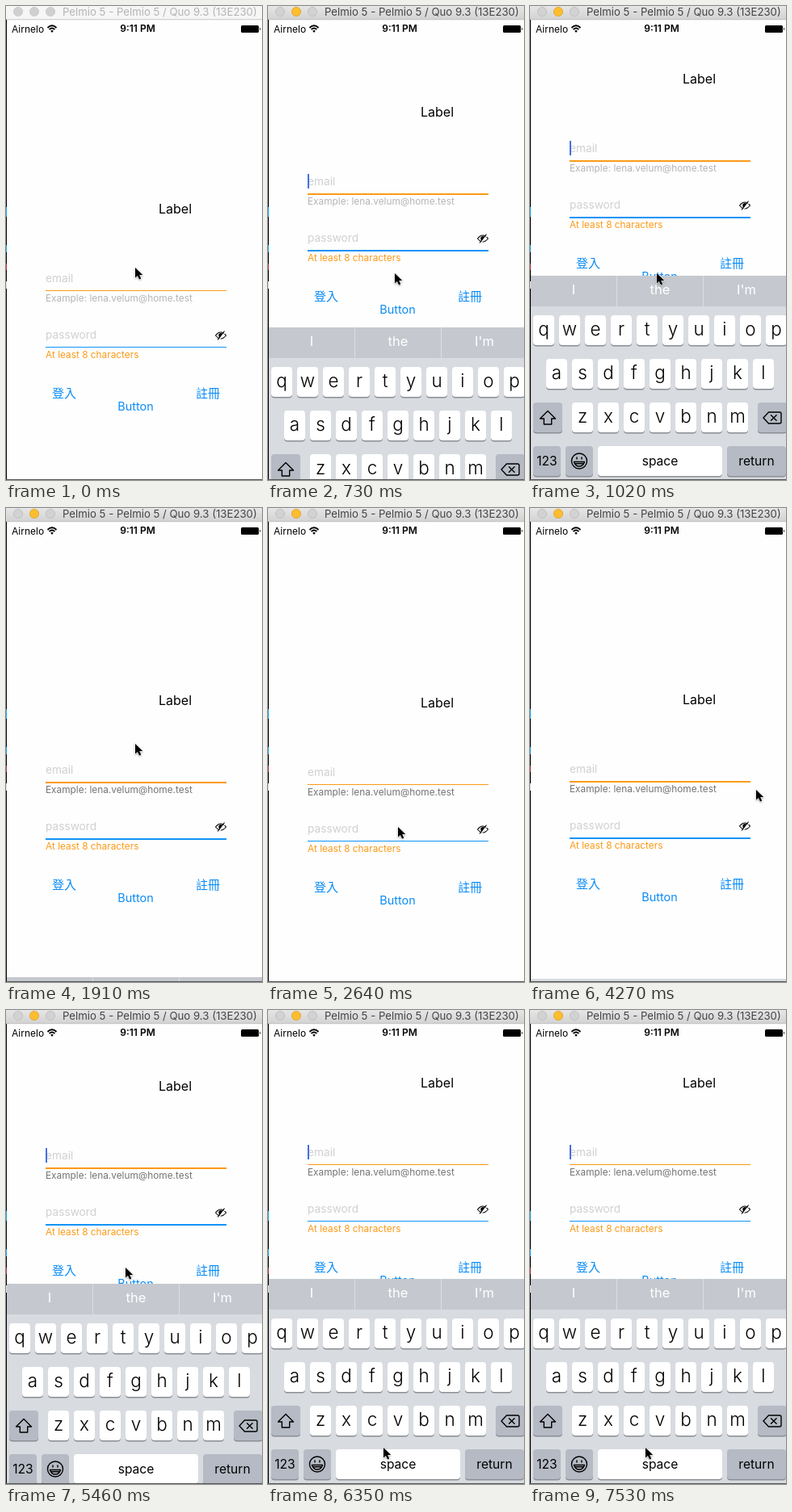
Animation, 317 px wide and 587 px high, one loop 8 s. Source, as an HTML page:

```html
<!DOCTYPE html>
<html lang="en">
<head>
<meta charset="utf-8">
<title>Login form with keyboard</title>
<style>
  html, body { margin: 0; width: 100%; height: 100%; overflow: hidden; background: #fff; }
  svg { display: block; width: 100%; height: 100%; }
  text { font-family: Inter, Roboto, "Noto Sans CJK TC", "Noto Sans CJK JP", sans-serif; white-space: pre; }
  .mid { text-anchor: middle; }
  .hint { font-size: 13.7px; fill: #d0d0d3; }
  .note { font-size: 11.85px; }
  .link { fill: #0a8cf7; }
  .key { font-size: 22.5px; font-weight: 300; }
  .word { font-size: 15.6px; }
  .bar { font-size: 16.5px; fill: #fff; }
  .icon { fill: none; stroke: #000; stroke-width: 1.4; stroke-linejoin: round; stroke-linecap: round; }
</style>
</head>
<body>
<svg viewBox="0 0 317 587" preserveAspectRatio="none">
  <defs>
    <linearGradient id="chrome" x2="0" y2="1">
      <stop stop-color="#e6e6e6"/><stop offset="1" stop-color="#d2d2d2"/>
    </linearGradient>
  </defs>
  <rect width="317" height="587" fill="#fefefe"/>

  <g id="form">
    <text x="189" y="257" font-size="16">Label</text>
    <text class="hint" x="49" y="342">email</text>
    <rect id="emailLine" x="49" y="352" width="224" height="1" fill="#fb9a18"/>
    <text id="emailNote" class="note" x="49" y="366">Example: lena.velum@home.test</text>
    <text class="hint" x="49" y="412">password</text>
    <rect id="passLine" x="49" y="422" width="224" height="1" fill="#1093f8"/>
    <text class="note" x="49" y="436" fill="#fb9a18">At least 8 characters</text>
    <g class="icon" transform="translate(266 408)" stroke-width="1">
      <path d="M-6.5 0Q0-8 6.5 0Q0 8-6.5 0Z" style="stroke-width:1.1"/>
      <path d="M-2.6-1.5Q-3 2-1.5 2.5L2-2.5Q-1-4-2.6-1.5Z" fill="#000" stroke="none"/>
      <path d="M-2.2 5.4L5.6-4.2" stroke="#fff" style="stroke-width:1.2"/>
      <path d="M-3.6 5L4.2-5" style="stroke-width:1.2"/>
    </g>
    <text class="link mid" x="72" y="484.7" font-size="15">登入</text>
    <text class="link mid" x="250" y="484.7" font-size="15">註冊</text>
    <text class="link mid" x="160.5" y="500.5" font-size="14.4">Button</text>
    <rect id="caret" x="49" width="2" height="18" fill="#466fe0"/>
  </g>

  <text x="7" y="32.5" font-size="12">Airnelo</text>
  <g fill="none" stroke="#000" stroke-width="1.8">
    <path d="M51.5 27Q57 21.5 62.5 27M53.6 29.2Q57 25.8 60.4 29.2"/>
    <path d="M57 33L55.2 30.8Q57 29.4 58.8 30.8Z" fill="#000" stroke="none"/>
  </g>
  <text class="mid" x="163" y="32.3" font-size="12" font-weight="600">9:11 PM</text>
  <rect x="291" y="24" width="22" height="9" rx="1.5"/>
  <path d="M314 26.8q2 1.7 0 3.4z"/>

  <g id="keyboard"></g>

  <rect id="titleBar" width="317" height="17"/>
  <rect y="16.4" width="317" height=".8" fill="#bbb"/>
  <g id="dots"></g>
  <text id="title" x="70" y="12" font-size="13.2">Pelmio 5 - Pelmio 5 / Quo 9.3 (13E230)</text>

  <rect y="17" width="1" height="570"/>
  <path d="M0 249h1v12h-1zM0 296h1v9h-1z" fill="#16a5e8"/>
  <path d="M0 319h1v8h-1z" fill="#b03038"/>
  <path d="M0 341h1v9h-1z" fill="#ddd"/>
  <rect y="586" width="317" height="1" fill="#555"/>

  <g id="pointer">
    <path d="M0 0V15L3.5 11.8L6 17.2L8.6 16L6.2 10.8H11Z" transform="scale(.84)" stroke="#fff" stroke-width="1.2"
          paint-order="stroke" style="filter:drop-shadow(0 1px 1px rgba(0,0,0,.35))"/>
  </g>
</svg>

<script>
const LOOP = 8000, TICK = 147.2, BAR = 38;
const $ = id => document.getElementById(id);

function add(parent, tag, attrs, text = '') {
  const el = document.createElementNS('http://www.w3.org/2000/svg', tag);
  set(el, attrs);
  el.textContent = text;
  return parent.appendChild(el);
}
function set(el, attrs) {
  for (const name in attrs) el.setAttribute(name, attrs[name]);
}

// Keyboard: y = 0 is the top of the key area.
const board = $('keyboard'), GREY = '#b5bac4';
const group = () => add(board, 'g', {});

function key(parent, x, y, width, label, cls = 'key', fill = '#fff') {
  add(parent, 'rect', { x, y: y + 1, width, height: 37.5, rx: 4, fill: '#8b8e94' });
  const face = add(parent, 'rect', { x, y, width, height: 37, rx: 4, fill });
  add(parent, 'text', { x: x + width / 2, y: y + (cls === 'key' ? 25 : 24), class: cls + ' mid' }, label);
  return face;
}
function icon(parent, x, y, d) {
  add(parent, 'path', { class: 'icon', transform: `translate(${x} ${y})`, d });
}

const suggestions = group();
add(suggestions, 'rect', { y: -BAR, width: 317, height: BAR, fill: '#c5c9cf' });
['I', 'the', "I'm"].forEach((word, i) => {
  add(suggestions, 'text', { x: 54 + 107 * i, y: -15, class: 'bar mid' }, word);
  if (i) add(suggestions, 'rect', { x: 107 * i, y: -BAR, width: 1, height: BAR, fill: '#dadde1' });
});

const keys = group();
add(keys, 'rect', { width: 317, height: 217, fill: '#d8dbe0' });
[['qwertyuiop', 4], ['asdfghjkl', 20], ['zxcvbnm', 52]].forEach(([row, left], r) =>
  [...row].forEach((c, i) => key(keys, left + 32 * i, 11 + 54 * r, 26, c)));
key(keys, 4, 119, 36, '', 'word', GREY);
icon(keys, 22, 138, 'M0-8.5L9.5 1H4.7V8H-4.7V1H-9.5Z');
key(keys, 282, 119, 36, '', 'word', GREY);
icon(keys, 300, 138, 'M-11 0L-4.5-7H9Q11-7 11-5V5Q11 7 9 7H-4.5ZM-1.5-3.3L5.1 3.3M5.1-3.3L-1.5 3.3');
const spaceKey = key(keys, 84, 173, 154, 'space', 'word');
key(keys, 244, 173, 73, 'return', 'word', GREY);

const narrowKeys = group();
key(narrowKeys, 4, 173, 34, '123', 'word', GREY);
key(narrowKeys, 44, 173, 34, '', 'word', GREY);
icon(narrowKeys, 61, 191.5, 'M-9.5 0A9.5 9.5 0 1 1 9.5 0A9.5 9.5 0 1 1-9.5 0M-6.5 1H6.5Q5 6.5 0 6.5T-6.5 1M-5 3.2H5M-3-4.5V-2.5M3-4.5V-2.5');
const wideKey = group();
key(wideKey, 4, 173, 74, '123', 'word', GREY);

const dots = [15, 35, 55].map(cx => add($('dots'), 'circle', { cx, cy: 7, r: 5.6, 'stroke-width': .8 }));

// Each phase springs the form and the keyboard to a new rest position.
const phases = [
  { at: -9999, lift: 0, height: 0 },
  { at: 590, lift: 161, height: 254, field: 'email' },
  { at: 1600, lift: 10, height: 0 },
  { at: 2920, lift: 212, height: 216, field: 'password' },
  { at: 3950, lift: 10, height: 0 },
  { at: 5138, lift: 161, height: 254, field: 'email' }
];

const pointerPath = [
  [0, 160, 324], [100, 160, 324], [140, 157, 331], [1050, 157, 331], [1450, 160, 292], [2150, 160, 292],
  [2620, 161, 395], [3150, 161, 395], [3660, 280, 349], [4300, 280, 349], [4840, 148, 319],
  [5500, 148, 319], [6160, 143, 542], [LOOP, 143, 542]
];

const within = (t, from, to) => t >= from && t < to;
const mix = (a, b, p) => a + (b - a) * p;

function spring(ms) {
  const w = Math.max(0, ms) * .01826;
  return 1 - (1 + w) * Math.exp(-w);
}

function pointerAt(t) {
  const i = pointerPath.findIndex(stop => stop[0] > t);
  const [t0, x0, y0] = pointerPath[i - 1], [t1, x1, y1] = pointerPath[i];
  const p = (t - t0) / (t1 - t0), ease = p * p * (3 - 2 * p);
  return [mix(x0, x1, ease), mix(y0, y1, ease)].map(Math.round);
}

function render(time) {
  // The screen refreshes in coarse steps.
  const t = Math.floor((time % LOOP + 12) / TICK) * TICK;

  const now = phases.findLastIndex(phase => phase.at <= t);
  const phase = phases[now], before = phases[Math.max(0, now - 1)];
  const age = t - phase.at, p = spring(age);
  const lift = Math.round(mix(before.lift, phase.lift, p));
  const height = Math.round(mix(before.height, phase.height, p));
  const field = phase.field, thickness = age < 590 ? 2 : 1;

  set($('form'), { transform: `translate(0 ${-lift})` });
  set($('emailLine'), { height: thickness });
  set($('passLine'), { height: thickness });
  set($('emailNote'), { fill: now > 1 ? '#747474' : '#b5b5b5' });

  const blinkOff = within(t, 1310, 1460) || within(t, 3670, 3960) || within(t, 6030, 6320);
  set($('caret'), { y: field === 'password' ? 398 : 328, opacity: field && age > 100 && !blinkOff ? 1 : 0 });

  const emailBoard = (field || before.field) === 'email';
  const full = emailBoard ? 254 : 216;
  set(board, { transform: `translate(0 ${587 - height + full - 216})`, opacity: height > 0 ? 1 : 0 });
  set(suggestions, { opacity: +emailBoard });
  set(narrowKeys, { opacity: +emailBoard });
  set(wideKey, { opacity: +!emailBoard });
  const pressed = within(t, 7060, 7200) || within(t, 7350, 7500);
  set(spaceKey, { fill: pressed ? GREY : '#fff' });

  const active = t > 430;
  set($('titleBar'), { fill: active ? 'url(#chrome)' : '#f6f6f6' });
  set($('title'), { fill: active ? '#444' : '#b4b4b4' });
  dots.forEach((dot, i) => set(dot, active && i === 1
    ? { fill: '#fdbd2f', stroke: '#dda02a' }
    : { fill: active ? '#d2d2d2' : '#d0d0d0', stroke: active ? '#bcbcbc' : '#c8c8c8' }));

  set($('pointer'), { transform: `translate(${pointerAt(t).join(' ')})` });
}

const start = performance.now();
function loop() {
  render(performance.now() - start);
  requestAnimationFrame(loop);
}
loop();
</script>
</body>
</html>
```
